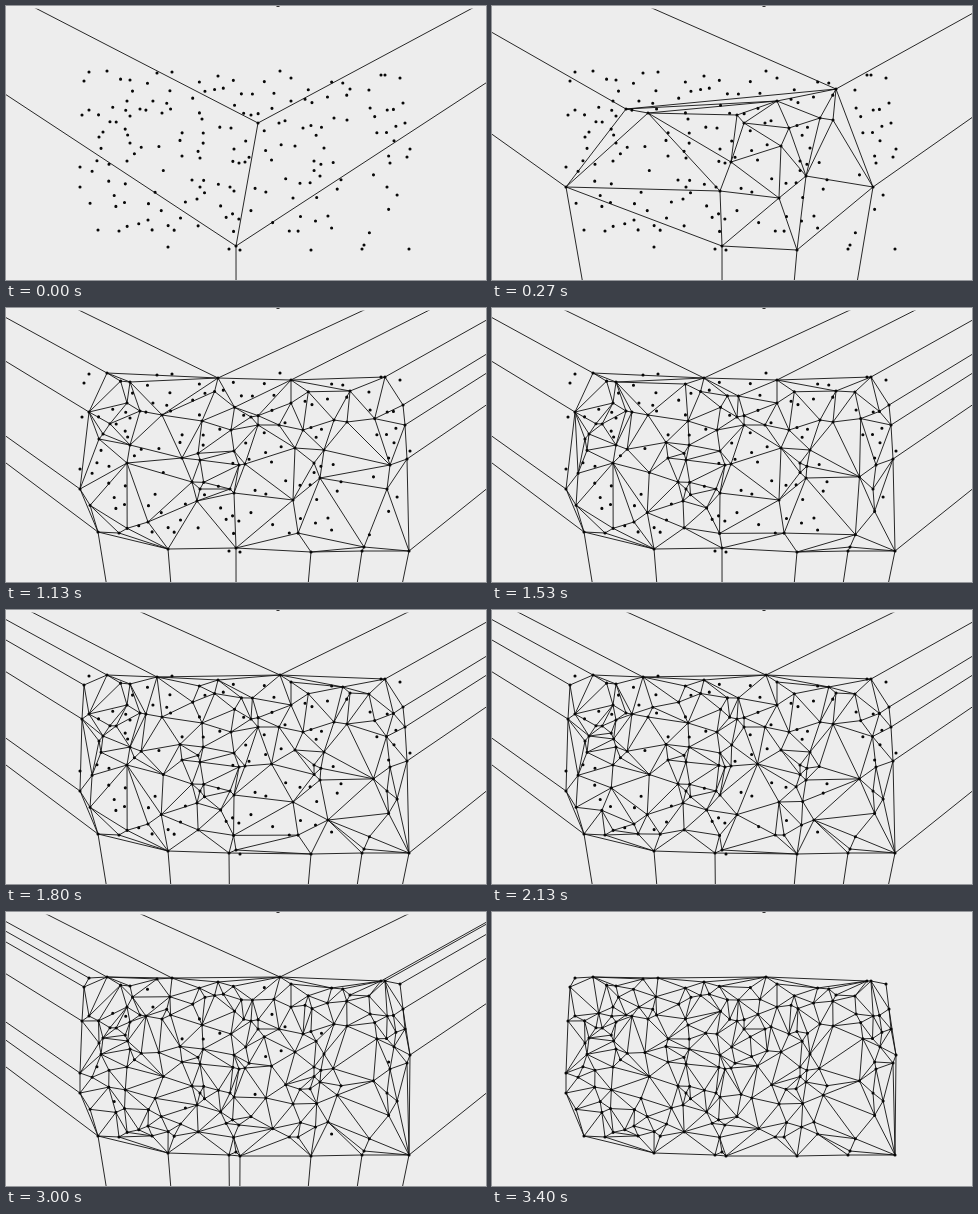
An HTML page for the animation above (3.87 s loop, 480 by 274 pixels).

```html
<!DOCTYPE html>
<html lang="en">
<head>
<meta charset="utf-8">
<title>Incremental Delaunay triangulation</title>
<style>
html, body { margin: 0; height: 100%; overflow: hidden; background: #ededed; }
svg { display: block; width: 100vw; height: 100vh; }
</style>
</head>
<body>
<svg viewBox="0 0 480 274">
  <rect width="480" height="274" fill="#ededed"/>
  <path id="mesh" fill="none" stroke="#111" stroke-width=".9"/>
  <path id="dots" fill="none" stroke="#080808" stroke-width="3.1" stroke-linecap="round"/>
  <rect width="480" height="2.6" fill="#ededed"/>
  <rect x="270.5" width="3" height="1" fill="#333"/>
</svg>
<script>
const LOOP = 3870, STEP = 1000 / 15, LAST = 51;

// Each batch: step when it is complete, number of scattered points, key points.
const batches = [
  [0, 0, [252,117, 230,240]],
  [4, 0, [289,140, 74,181, 344,83, 228,185, 305,244, 134,103, 328,112, 239,156,
    381,181, 245,109, 314,170, 156,107, 297,122, 287,192, 341,114, 285,95]],
  [11, 0, [121,155, 397,97, 196,113, 356,243, 93,131, 318,142, 194,181, 124,74,
    225,122, 113,225, 401,151, 285,72, 176,150, 233,157, 97,126, 273,117,
    142,214, 399,117, 186,174, 121,95, 228,143, 358,239, 191,193, 124,137,
    224,181]],
  [23, 35, [83,104, 403,243, 194,152, 379,69, 162,241, 308,155, 101,65, 92,224,
    384,157, 212,70]],
  [32, 24, [223,243, 78,75, 274,65, 76,109, 151,67]],
  [39, 24, [166,66, 74,161, 375,69]],
  [50, 38, [234,244, 83,66, 404,143, 394,72]]
];

let seed = 29;
function rand() {
  seed = (seed * 16807) % 2147483647;
  return seed / 2147483647;
}

// Keeps scattered points inside the outline and apart from each other.
function fits([x, y], taken) {
  return x > 131 - .46 * y && x < 375 + .6 * (y - 70) && y < 150 + .6 * x
    && taken.every(q => Math.hypot(q[0] - x, q[1] - y) > 6);
}

function scatter(taken) {
  let p;
  do p = [84 + 312 * rand(), 73 + 159 * rand() ** 1.2]; while (!fits(p, taken));
  taken.push(p);
  return p;
}

const pairs = flat => flat.flatMap((x, i) => i % 2 ? [] : [[x, flat[i + 1]]]);

function schedule() {
  const keys = batches.map(b => pairs(b[2]));
  const taken = keys.flat(), queue = [];
  let from = 0;
  batches.forEach(([until, extra], n) => {
    const list = keys[n];
    for (let i = 0; i < extra; i++) list.push(scatter(taken));
    list.forEach((p, i) => queue.push({
      p, step: from + Math.ceil((i + 1) * (until - from) / list.length)
    }));
    from = until;
  });
  return queue;
}

// Corners of the enclosing triangle come first.
const pts = [[-720, -385], [1185, -383], [231, 1080]];
let tris = [[0, 1, 2]];

function inCircle([a, b, c], [x, y]) {
  const [ax, ay] = [pts[a][0] - x, pts[a][1] - y];
  const [bx, by] = [pts[b][0] - x, pts[b][1] - y];
  const [cx, cy] = [pts[c][0] - x, pts[c][1] - y];
  return (ax * ax + ay * ay) * (bx * cy - cx * by)
       - (bx * bx + by * by) * (ax * cy - cx * ay)
       + (cx * cx + cy * cy) * (ax * by - bx * ay) > 0;
}

const sides = ([a, b, c]) => [[a, b], [b, c], [c, a]];

// Bowyer-Watson: replace the triangles whose circle holds p with a fan.
function insert(p) {
  const id = pts.push(p) - 1;
  const rim = new Map(), kept = [];
  for (const t of tris) {
    if (!inCircle(t, p)) { kept.push(t); continue; }
    for (const [a, b] of sides(t)) {
      if (!rim.delete(b + "," + a)) rim.set(a + "," + b, [a, b]);
    }
  }
  for (const [a, b] of rim.values()) kept.push([a, b, id]);
  tris = kept;
}

function meshPath(inner) {
  let d = "";
  for (const t of tris) for (const [a, b] of sides(t)) {
    if (a < b && (!inner || a > 2)) d += "M" + pts[a] + "L" + pts[b];
  }
  return d;
}

const queue = schedule();
const meshes = [];
for (let s = 0, next = 0; s <= LAST; s++) {
  while (next < queue.length && queue[next].step <= s) insert(queue[next++].p);
  meshes.push(meshPath(s === LAST));
}

document.getElementById("dots").setAttribute("d",
  queue.map(({ p }) => "M" + p + "h.01").join(""));

const mesh = document.getElementById("mesh");
let shown = -1;
function draw(now) {
  const step = Math.min(LAST, Math.floor((now % LOOP + 4) / STEP));
  if (step !== shown) mesh.setAttribute("d", meshes[shown = step]);
}

const start = performance.now();
function tick() {
  draw(performance.now() - start);
  requestAnimationFrame(tick);
}
tick();
</script>
</body>
</html>
```
